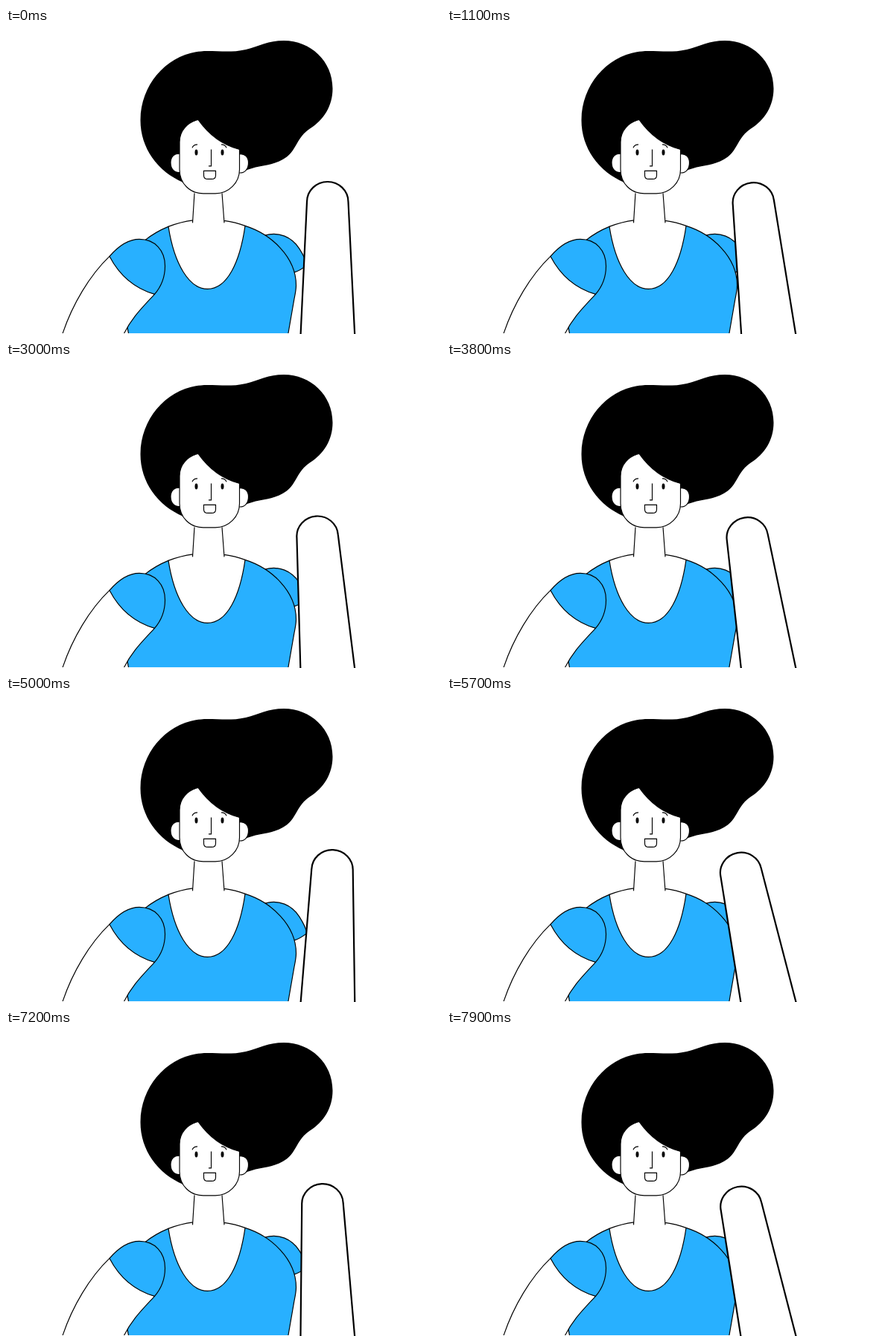
Recreate the animation shown at these times as an HTML page. Size 584x412 px, loop 8000 ms.

```html
<!DOCTYPE html>
<html lang="en">
<head>
<meta charset="utf-8">
<title>Waving woman</title>
<style>
  html, body { margin: 0; width: 100%; height: 100%; overflow: hidden; background: #fff; }
  #stage { display: block; width: 584px; height: 412px; }
  .line { fill: none; stroke: #000; stroke-width: 1.15; }
  .skin { fill: #fff; stroke: #000; stroke-width: 1.15; }
  .cloth { fill: #28b0ff; stroke: #000; stroke-width: 1.15; }
  #arm { fill: #fff; stroke: #000; stroke-width: 2.2; }
</style>
</head>
<body>
<svg id="stage" viewBox="0 0 584 412">
  <!-- the body ends one pixel above the stage edge -->
  <svg width="584" height="411" viewBox="0 -0.4 584 411">
    <!-- hair -->
    <path d="M238 207.500C203 193 180 160 180.500 123C181 72 221 30.500 270 30.500C288 30.500 302 33 322 28.500C340 24 352 16.500 373 16.500C409 16.500 438.500 44 438.500 81C438.500 104 427 123 408 135C391 146 390 163 377 173C364 183 348 184 335 187L322 191L300 180Z"/>

    <!-- neck and shoulders -->
    <path class="line" d="M253 222L250.500 262M290 222L293 262M218 267Q235 260.500 251 258.500M293 259Q308 261 321 266"/>

    <!-- far sleeve, shirt -->
    <path class="cloth" d="M347 279C366 273 384 281 394 297C399 305 403 313 404 319C399 323 393 327 386 329L365 300Z"/>
    <path class="cloth" d="M218 267C226 318 246 351 270.500 351C297 351 314 315 321 266C356 277 389.500 308 389.500 346C389.500 352 388 359 387 364L378 416H165.500L163 403L187 285Q201 274 218 267Z"/>

    <!-- near arm and sleeve -->
    <path class="skin" d="M75 414C89 371 113 332 139 307L199.500 358C185 374 168 390 157 414Z"/>
    <path class="cloth" d="M139 307C152 292 165 284 179 284C200 284 213.500 299 213.500 320C213.500 337 208 348 199.500 358C172 350 152 332 139 307Z"/>

    <!-- head -->
    <path class="skin" d="M234 169C225 168 221 174 221 181C221 189 226 195 234 194Z"/>
    <path class="skin" d="M312.500 169.500C321 168 325.500 174 325.500 181C325.500 189 321 195.500 312.500 194.500Z"/>
    <path class="skin" d="M258 123C243 127 233 138 233 153V190C233 209 247 222.500 265 222.500H281C299 222.500 313.500 208 313.500 190V163C290 157 272 143 258 123Z"/>
    <ellipse cx="255.500" cy="167" rx="2" ry="4"/>
    <ellipse cx="290.500" cy="167" rx="2" ry="4"/>
    <path class="line" d="M250 161Q251.500 156.500 257 156.500M289 156.500Q294.500 156.500 296 161M275.500 163V185.500H272"/>
    <path class="line" d="M265.500 192H281.500V198Q281.500 203 276 203H271Q265.500 203 265.500 198Z"/>
  </svg>

  <path id="arm" d="M393.800 450L404 234A27.750 27 0 0 1 459.500 234L470 450Z"/>
</svg>
<script>
  const LOOP = 8000, STEP = 100, WAVE = 4300;
  // [time in ms, arm angle in degrees]
  const keys = [[0, 0], [500, 2.5], [1365, -12], [2430, 2.5], [3410, -12], [WAVE, 0]];
  const arm = document.getElementById('arm');

  function angleAt(time) {
    const i = keys.findIndex(([end]) => time < end);
    const [t0, a0] = keys[i - 1], [t1, a1] = keys[i];
    const p = (time - t0) / (t1 - t0);
    return a0 + (a1 - a0) * p * p * (3 - 2 * p);
  }

  function draw(now) {
    const tick = Math.floor((now % LOOP) / STEP) * STEP;
    const time = Math.max(0, tick - STEP) % WAVE;  // short rest before the first wave
    arm.setAttribute('transform', `rotate(${angleAt(time).toFixed(3)} 431.5 416)`);
  }

  const start = performance.now();
  function frame() {
    draw(performance.now() - start);
    requestAnimationFrame(frame);
  }
  frame();
</script>
</body>
</html>
```
